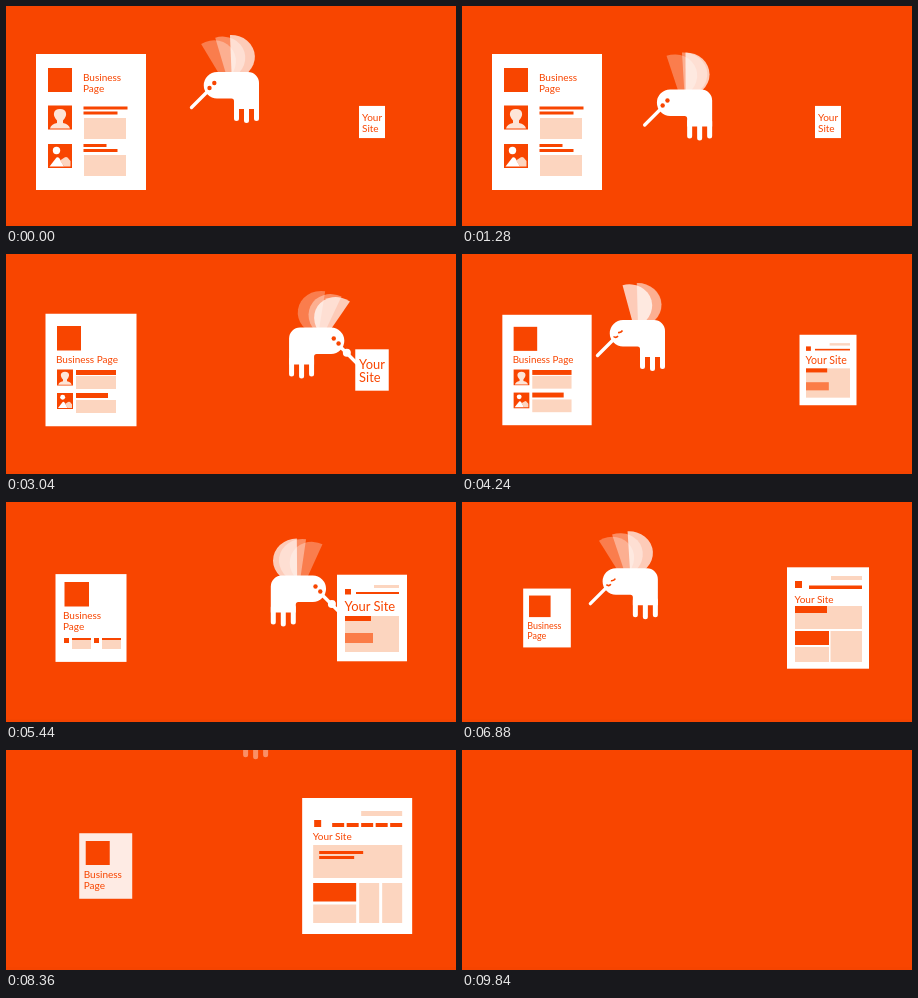
Animation, 450 px wide and 220 px high, one loop 10000 ms. Source, as an HTML page:

```html
<!DOCTYPE html>
<html lang="en">
<head>
<meta charset="utf-8">
<title>Hummingbird moving content between pages</title>
<style>
html, body { margin: 0; width: 100%; height: 100%; overflow: hidden; background: #f84500; }
svg { display: block; width: 450px; height: 220px; }
text { font: 10px Lato, "Open Sans", sans-serif; fill: #f84500; }
</style>
</head>
<body>
<svg id="stage" viewBox="0 0 450 220"></svg>
<script>
const LOOP = 10000, MID = 116, RATIO = 136 / 110;
const ORANGE = '#f84500', PEACH = '#fcd5bf';

// Markup helpers: x, y, width, height
const box = (x, y, w, h, fill = ORANGE) =>
  `<rect x="${x}" y="${y}" width="${w}" height="${h}" fill="${fill}"/>`;
const soft = (x, y, w, h) => box(x, y, w, h, PEACH);
const label = (x, y, str, size = 10) =>
  `<text x="${x}" y="${y}" style="font-size:${size}px">${str}</text>`;
const repeat = (n, fn) => Array.from({ length: n }, (_, i) => fn(i)).join('');
const icon = (x, y, size, inner) =>
  `<g transform="translate(${x} ${y}) scale(${size / 24})">${box(0, 0, 24, 24)}${inner}</g>`;
const avatar = (x, y, size) => icon(x, y, size,
  `<path d="M2 23Q3 18.500 9 17.500V15C4 10 5 3.500 12 3.500S20 10 15 15V17.500Q21 18.500 22 23Z" fill="#fde5d8"/>`);
const picture = (x, y, size) => icon(x, y, size,
  `<circle cx="8.500" cy="6.500" r="3.700" fill="#fff"/>
   <path d="M1.500 22.500L8.500 13.500Q10 12.500 11.500 14.500L16 22.500Z" fill="#fff"/>
   <path d="M12 16.500L16.500 13.500Q18 12.500 19.500 13.500L22.500 17V22.500H16Z" fill="${PEACH}"/>`);

// Each layout: width it is drawn at, its centre x, content
const pageLayouts = [
  [110, 85, box(42, 62, 24, 24) + label(77, 75, 'Business') + label(77, 86, 'Page') +
    avatar(42, 99.5, 24) + picture(42, 138, 24) +
    repeat(2, i => box(77.5, 100.5 + 37.5 * i, 44 - 21 * i, 3) + box(77.5, 105.500 + 37.500 * i, 34, 3) +
      soft(78, 112 + 37 * i, 42, 21))],
  [91, 85, box(51, 72, 24, 24.5) + label(50, 109, 'Business Page') +
    avatar(51, 115.5, 16) + picture(51, 139, 16) +
    repeat(2, i => box(70, 116 + 23 * i, 40 - 8 * i, 5) + soft(70, 122 + 24 * i, 40, 13))],
  [71, 85, box(58.5, 80, 24.5, 24.5) + label(57, 117, 'Business') + label(57, 128, 'Page') +
    repeat(2, i => box(58 + 30 * i, 136, 5, 5) + box(66 + 30 * i, 136, 19, 2) +
      soft(66 + 30 * i, 138, 19, 9))],
  [53, 100, box(80, 91, 24, 24) + label(78, 128, 'Business') + label(78, 139, 'Page')]
];
const siteLayouts = [
  [26, 366, label(356, 115, 'Your') + label(356, 125.5, 'Site')],
  [70, 366, box(339, 87, 6, 5.5) + soft(368, 83, 25, 3) + box(350, 90, 43, 2) +
    label(338.500, 109, 'Your Site', 13) + soft(339, 114, 54, 36) +
    box(339, 114, 26, 5) + box(339, 131, 28, 10, '#fb7c47')],
  [82, 366, box(333, 79, 7, 7) + soft(369, 74, 31, 4) + box(347, 83.5, 53, 3.5) +
    label(332.500, 101, 'Your Site') + soft(333, 104, 67, 23) + box(333, 104, 32, 7) +
    box(333, 129, 34, 14) + soft(333, 145, 34, 15) + soft(368.5, 129, 31.5, 31)],
  [110, 351, soft(355, 61, 41, 5) + box(308, 70, 7, 7) +
    repeat(5, i => box(326 + i * 14.5, 73, 12, 4)) +
    label(306.500, 90, 'Your Site') + soft(307, 95, 89, 33) +
    repeat(2, i => box(313, 101 + 5 * i, 44 - 9 * i, 3)) +
    box(307, 133, 43, 18.5) + soft(307, 154.5, 43, 18.5) +
    repeat(2, i => soft(353 + 23 * i, 133, 20, 40))]
];

const card = (id, layouts) => `<g id="${id}"><rect fill="#fff"/>` +
  layouts.map(l => `<g>${l[2]}</g>`).join('') + '</g>';
const wing = alpha =>
  `<path class="wing" d="M226.500 73V29A24 22 0 0 1 226.500 73Z" fill="#fff" opacity="${alpha}"/>`;

document.getElementById('stage').innerHTML =
  box(0, 0, 450, 220) + box(0, 217, 450, 3, '#f54400') + card('page', pageLayouts) +
  `<g id="bird">
    ${wing(.3)}${wing(.38)}${wing(.72)}
    <path d="M211 66H242A11 11 0 0 1 253 77V103H228V95Q228 92.500 225.500 92.500H211A13.200 13.200 0 0 1 211 66Z" fill="#fff"/>
    <g fill="none" stroke="#fff" stroke-width="5" stroke-linecap="round">
      <path d="M230.500 98V112.500M240.500 98V114.500M250.500 98V112.500"/>
      <path d="M201 86L185.500 101.500" stroke-width="3.300"/>
    </g>
    <g id="open" fill="${ORANGE}"><circle cx="208.3" cy="77" r="2.2"/><circle cx="203.5" cy="82" r="2.2"/></g>
    <path id="shut" d="M206 78.500Q209 79 210.500 76.500M201.500 82.500Q204 84.500 206 82"
      fill="none" stroke="${ORANGE}" stroke-width="1.6"/>
    <circle id="drop" r="4" fill="#fff"/>
  </g>` + card('site', siteLayouts);

const get = id => document.getElementById(id);
const wings = document.querySelectorAll('.wing');
const set = (el, attrs) => { for (const k in attrs) el.setAttribute(k, attrs[k]); };
const clamp = p => Math.min(1, Math.max(0, p));
const smooth = p => p * p * (3 - 2 * p);
const ramp = (t, a, b) => smooth(clamp((t - a) / (b - a)));
const mix = (a, b, p) => a + (b - a) * p;

// Three trips: the bird takes from the page, then gives to the site
const PAGE = [110, 91, 71, 53], SITE = [26, 57, 82, 110];
const takeAt = i => 2040 + 2100 * i;
const giveAt = i => 2866 + 2300 * i;

// Resize step that overshoots, then settles
const pop = (dt, over) => (1 + over) * ramp(dt, 0, 650) - over * ramp(dt, 650, 830);
const width = (t, sizes, startAt, over) => sizes.slice(1).reduce(
  (w, next, i) => w + (next - sizes[i]) * pop(t - startAt(i), over), sizes[0]);

function drawCard(el, layouts, cx, cy, w, swap) {
  const h = w * RATIO;
  set(el.firstChild, { x: cx - w / 2, y: cy - h / 2, width: w, height: h });
  layouts.forEach(([natural, mid], i) => {
    const shown = i ? swap(i - 1) : 1;
    const gone = i < layouts.length - 1 ? swap(i) : 0;
    set(el.children[i + 1], {
      opacity: shown * (1 - gone),
      transform: `translate(${cx} ${cy}) scale(${w / natural}) translate(${-mid} ${-MID})`
    });
  });
}

function drawBird(t, siteW) {
  const i = t < takeAt(1) ? 0 : t < takeAt(2) ? 1 : 2;
  const give = giveAt(i), leave = give - 640, home = give + 650;
  const perch = n => 85 + PAGE[n] / 2 + 45;
  const out = ramp(t, leave, leave + 600);
  const back = i < 2 ? ramp(t, home, takeAt(i + 1)) : 0;
  const exit = ramp(t, 8050, 8460);

  const from = i ? perch(i) : mix(225.5, perch(0), ramp(t, 1200, 1700));
  const atSite = 366 - siteW / 2 - 38.7;
  const x = mix(mix(from, atSite, out), perch(i + 1), back) - 9 * exit;
  const bob = t < 2080 ? 20 * Math.sin(Math.PI * t / 2080) ** 2 : 0;
  const y = bob + 7.5 * out * (1 - back) - 14 * Math.sin(Math.PI * back) - 135 * exit;
  const right = t > leave + 100 && (i === 2 || t < home);
  set(get('bird'), {
    transform: `translate(${x} ${y}) scale(${right ? -1 : 1} 1) translate(-225.5 0)`,
    opacity: 1 - ramp(t, 8230, 8460)
  });

  // The two fainter wings trail the bright one
  wings.forEach((el, n) => {
    const phase = 2 * Math.PI * t / 208.6 + 2.53 - (2 - n) * .96;
    set(el, { transform: `rotate(${-17 - 17.5 * Math.cos(phase)} 227 90)` });
  });

  const shut = t > takeAt(i) - 100 && t < leave + 100;
  set(get('open'), { opacity: shut ? 0 : 1 });
  set(get('shut'), { opacity: shut ? 1 : 0 });
  const p = (t - give) / 470;
  set(get('drop'), { opacity: p > 0 && p < 1 ? 1 : 0, cx: 201 - 15.5 * p, cy: 85.5 + 15.5 * p });
}

function draw(t) {
  const merge = ramp(t, 8200, 9000);
  const lift = 190 * clamp((t - 9440) / 400) ** 2;
  const siteW = width(t, SITE, giveAt, .35);
  const swap = (startAt, delay) => i => ramp(t, startAt(i) + delay, startAt(i) + delay + 160);
  drawCard(get('page'), pageLayouts, 85 + 140 * merge, MID,
    width(t, PAGE, takeAt, .3), swap(takeAt, 120));
  set(get('page'), { opacity: 1 - merge });
  drawCard(get('site'), siteLayouts, 366 - 141 * merge, MID - lift, siteW, swap(giveAt, 280));
  drawBird(t, siteW);
}

const began = performance.now();
function tick() {
  draw((performance.now() - began) % LOOP);
  requestAnimationFrame(tick);
}
tick();
</script>
</body>
</html>
```
